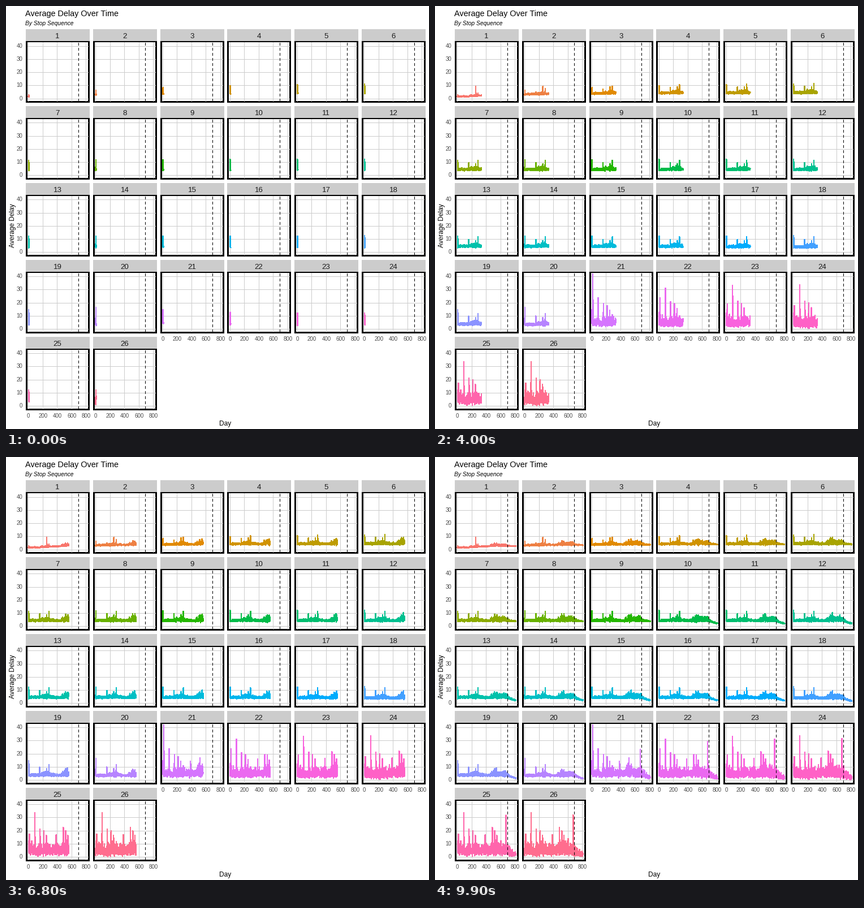
A matplotlib script for the animation above (10000 ms loop, 748x748 px).

```python
import numpy as np
import matplotlib.pyplot as plt
from matplotlib.animation import FuncAnimation
from matplotlib.patches import Rectangle

SIZE, DPI = 748, 64
PT = 72 / DPI                        # points per pixel
FRAMES, LAST, CUT = 100, 808, 692
X0, DAY, UNIT = 39.8, 0.1275, 2.325  # pixels per day and per delay unit
COL, ROW = 118.8, 135.9
STOPS, LATE = 26, 21                 # stops from LATE on are far noisier

# Shared bad days: (day, delay at first stop of the group, delay further on)
EARLY_EVENTS = [(155, 1, 9.5), (252, 9, 8.5), (284, 4, 11.3)]
LATE_EVENTS = [(14, 41.5, 17), (88, 23.5, 33.5), (160, 19, 21), (213, 17.5, 19.5),
               (248, 14, 16), (383, 14, 16.5), (482, 11, 22), (515, 16.5, 19.5),
               (545, 12, 16), (672, 23, 31.5)]

plt.rcParams["font.family"] = "Liberation Sans"
plt.rcParams["path.simplify"] = False
fig = plt.figure(figsize=(SIZE / DPI, SIZE / DPI), dpi=DPI, facecolor="white")
ax = fig.add_axes([0, 0, 1, 1])
ax.set(xlim=(0, SIZE), ylim=(SIZE, 0))
ax.axis("off")

days = np.arange(LAST + 1)


def hue(i, n=STOPS, chroma=100, lum=65):
    """Evenly spaced hues on the polar LUV wheel."""
    h = np.radians(15 + 360 * i / n)
    u = chroma * np.cos(h) / (13 * lum) + 0.1978
    v = chroma * np.sin(h) / (13 * lum) + 0.4683
    y = ((lum + 16) / 116) ** 3
    x = 9 * y * u / (4 * v)
    z = 3 * y / v - 5 * y - x / 3
    rgb = np.array([[3.2405, -1.5371, -0.4985],
                    [-0.9693, 1.8760, 0.0416],
                    [0.0556, -0.2040, 1.0572]]) @ [x, y, z]
    rgb = np.clip(rgb, 0, 1)
    return np.where(rgb > 0.0031, 1.055 * rgb ** (1 / 2.4) - 0.055, 12.92 * rgb)


def bump(x, centre, width):
    return np.exp(-((x - centre) / width) ** 2 / 2)


def ramp(x, a, b):
    return np.clip((x - a) / (b - a), 0, 1)


def noise(seed):
    """Skewed daily noise whose height changes from week to week."""
    rng = np.random.default_rng(seed)
    week = rng.uniform(0.35, 1.15, LAST // 7 + 1)
    return week[days // 7] * rng.random(LAST + 1) ** 1.4


def series(n):
    late = n >= LATE
    k = n - LATE if late else n - 1
    fall = ramp(days, 685, 785)

    low = 3.4 * (1 - np.exp(-(n - 0.6) / 1.1)) - 0.24 * max(0, n - 16)
    low = low + 1.2 * np.exp(1 - n) * ramp(days, 150, 500)
    if n >= 10:
        low = np.maximum(low - 1.6 * fall, 0.5)

    spread = 2 + 1.6 * bump(days, 250, 60) + 3.6 * bump(days, 525, 40) + 2 * bump(days, 640, 40)
    spread = spread * (1 - np.exp(-n / 2)) + late * (4.5 + 0.6 * k)
    spread *= 1 - 0.5 * fall

    mix = 0.7 * noise(late) + 0.3 * noise(100 + n)
    jitter = np.random.default_rng(n).normal(0, 0.07, LAST + 1)
    y = low + spread * (1.15 * mix + jitter)

    for d, start, end in LATE_EVENTS if late else EARLY_EVENTS:
        rate = 1.3 if late else 0.6
        y[d] = end + (start - end) * np.exp(-rate * k)
        y[d + 3] = max(y[d + 3], 0.45 * y[d])

    opening = 12 * (1 - np.exp(-(n - 0.4) / 2.4)) + 4 * bump(n, 20, 1)
    y[0], y[2], y[4] = 0.5 * opening, opening, 0.85 * opening
    return y


def text(x, y, s, size, color="black", **kw):
    kw.setdefault("ha", "center")
    ax.text(x, y, s, fontsize=size * PT, color=color, va="baseline", **kw)


def box(x, y, w, h, color, z):
    ax.add_patch(Rectangle((x, y), w, h, fc=color, ec="none", lw=0, aa=False, zorder=z))


def stroke(xs, ys, color, z, lw=1, **kw):
    return ax.plot(xs, ys, color=color, lw=lw * PT, aa=False, zorder=z, **kw)[0]


def snap(v):
    return np.floor(v) + 0.5


def panel(n):
    row, col = divmod(n - 1, 6)
    dx, dy = col * COL, row * ROW
    left, top = round(35 + dx), round(41 + dy)
    x0, zero = X0 + dx, 163 + dy
    right, low, high = left + 113, top + 127, top + 23

    box(left, top, 113, 21, "#cccccc", 1)
    box(left, top + 21, 113, 109, "black", 1)
    box(left + 3, high, 107, low - high, "white", 2)
    text(left + 56, top + 15.9, str(n), 13.3, "#1a1a1a")

    for v in range(0, 50, 10):
        y = snap(zero - v * UNIT)
        stroke([left + 3, right - 3], [y, y], "#cccccc", 3, solid_capstyle="butt")
        if col == 0:
            text(29.5, y + 3.5, str(v), 9.7, "#4d4d4d", ha="right")
    for d in range(0, 1000, 200):
        x = snap(x0 + d * DAY)
        stroke([x, x], [high, low], "#cccccc", 3, solid_capstyle="butt")
        if n > STOPS - 6:
            text(x, top + 143.3, str(d), 9.7, "#4d4d4d")
    x = snap(x0 + CUT * DAY)
    stroke([x, x], [low, high], "black", 6, ls=(0, (4, 4)), dash_capstyle="butt")

    line = stroke([], [], hue(n - 1), 5, lw=1.5)
    return line, x0 + days * DAY, zero - series(n) * UNIT


text(34.5, 17.5, "Average Delay Over Time", 14.4, ha="left")
text(34.5, 33.7, "By Stop Sequence", 10.2, ha="left", style="italic")
text(388, 742, "Day", 11.9)
text(15.5, 388.5, "Average Delay", 11.9, rotation=90, rotation_mode="anchor")
panels = [panel(n) for n in range(1, STOPS + 1)]


def update(i):
    shown = int(LAST * (i + 1) / FRAMES) + 1
    for line, xs, ys in panels:
        line.set_data(xs[:shown], ys[:shown])
    return [p[0] for p in panels]


anim = FuncAnimation(fig, update, frames=FRAMES, interval=100, repeat=True, repeat_delay=0)
plt.show()
```
